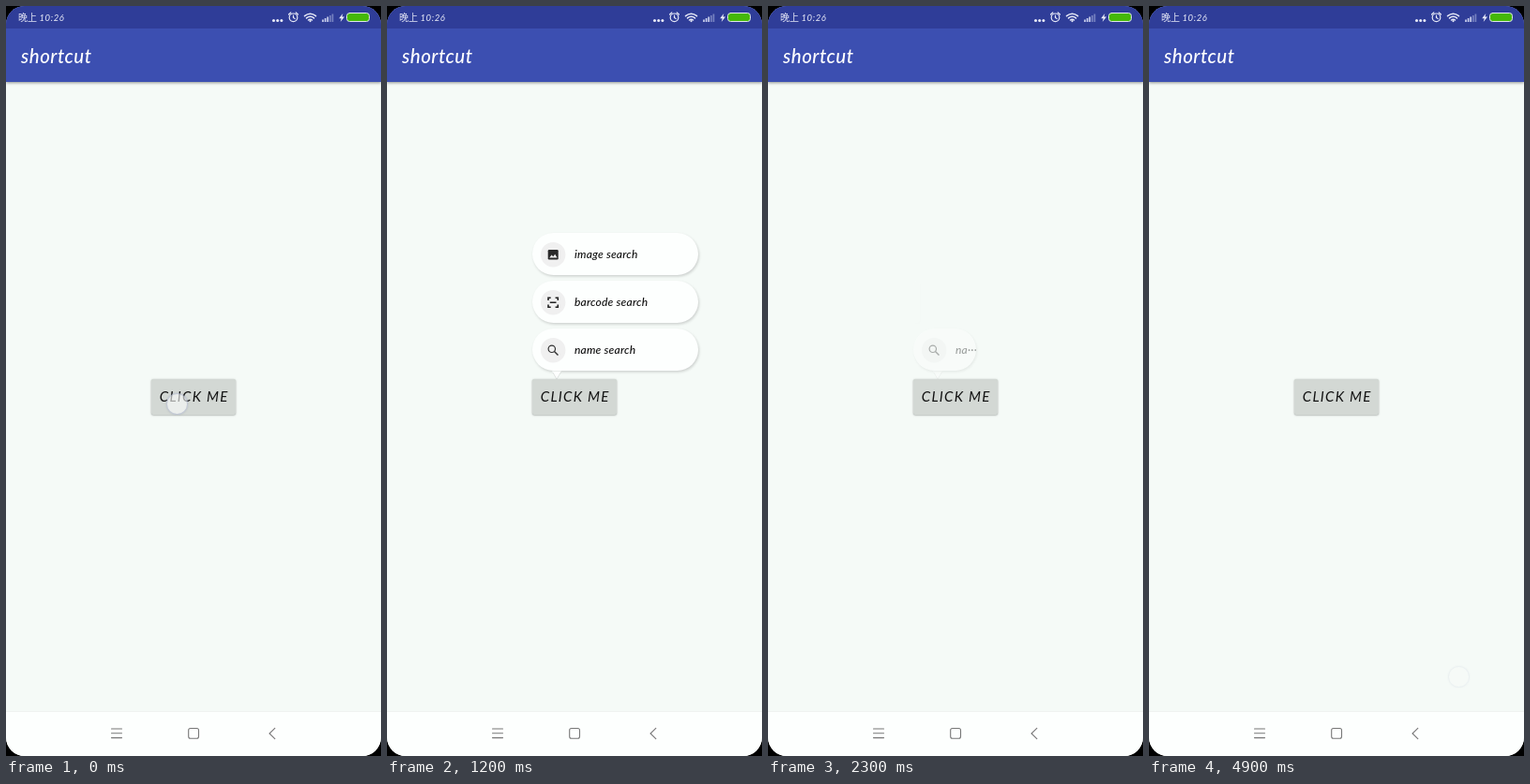
Write an HTML page that moves like this. It is 400 by 800 pixels and loops after 5200 ms.

```html
<!DOCTYPE html>
<html lang="en">
<head>
<meta charset="utf-8">
<title>shortcut</title>
<style>
html, body { margin: 0; width: 100%; height: 100%; overflow: hidden; background: #000; }
#screen {
  position: relative; width: 400px; height: 800px; overflow: hidden;
  border-radius: 20px; background: #f5faf7;
  font-family: Lato, "Open Sans", sans-serif; font-style: italic;
}
#screen div, #screen svg { position: absolute; }
#bar { left: 0; top: 0; width: 400px; height: 81px; background: #3c4fb1; box-shadow: 0 1px 3px rgba(0,0,0,.42); }
#status { left: 0; top: 0; width: 400px; height: 24px; background: #2f3d98; }
#nav { left: 0; top: 752px; width: 400px; height: 48px; background: #fdfffe; }
#chrome { left: 0; top: 0; }
#button {
  left: 154.5px; top: 398px; width: 90.5px; height: 38px; overflow: hidden; border-radius: 2px;
  background: #d3d8d4; box-shadow: 0 .5px 2px rgba(0,0,0,.36);
}
#button span {
  position: absolute; left: 9.3px; top: 0; line-height: 37px; white-space: nowrap;
  font-size: 15px; letter-spacing: 1.25px; color: #111;
}
.row {
  left: 154.5px; height: 45px; overflow: hidden; border-radius: 22.5px;
  background: #fdfffe; box-shadow: 1px 1.5px 3px rgba(0,0,0,.17);
}
.row span {
  position: absolute; left: 45.5px; top: 0; line-height: 45px; white-space: pre;
  font-size: 12px; font-weight: 500; letter-spacing: .2px; color: #111;
}
.row svg { left: 9px; top: 9.5px; }
.ripple { border-radius: 50%; background: #000; }
#tip { left: 175px; top: 388.5px; }
#touch {
  width: 23px; height: 23px; border-radius: 50%; box-sizing: border-box;
  background: rgba(250,252,251,.62); border: 1px solid rgba(135,145,180,.4);
  box-shadow: 0 0 2px rgba(80,90,120,.25);
}
</style>
</head>
<body>
<div id="screen">
  <div id="bar"><div id="status"></div></div>
  <div id="nav"></div>
  <svg id="chrome" width="400" height="800" fill="none" stroke-linecap="round">
    <g fill="#e9ebf8">
      <text x="13" y="16" font-size="10" font-style="normal" font-family="'Noto Sans CJK SC','Noto Sans CJK',sans-serif">晚上</text>
      <text x="35.5" y="16.3" font-size="9.5" letter-spacing=".6">10:26</text>
      <circle cx="285.5" cy="15.5" r="1.5"/><circle cx="289.7" cy="15.5" r="1.5"/><circle cx="293.9" cy="15.5" r="1.5"/>
      <path d="M359.3 8 L355.2 13.3 H357.7 L356.7 17 L361 11.6 H358.4 Z"/>
    </g>
    <text x="16" y="60.5" font-size="20.5" font-weight="500" letter-spacing=".5" fill="#fff">shortcut</text>
    <g stroke="#e4e7f6" stroke-width="1.2">
      <circle cx="306.5" cy="12.3" r="4.3"/>
      <path d="M306.5 10 V12.5 L308.2 13.5 M301.5 9 L303.8 7 M311.5 9 L309.2 7"/>
      <path d="M318.5 10.7 Q324.5 5.7 330.5 10.7 M320.5 12.9 Q324.5 9.6 328.5 12.9 M322.5 15 Q324.5 13.4 326.5 15" stroke-width="1.5"/>
      <circle cx="324.5" cy="16.1" r=".5"/>
    </g>
    <g stroke-width="1.7" stroke-linecap="butt">
      <path d="M338 17 V14.5 M340.6 17 V13 M343.2 17 V11.5" stroke="#c9cfed"/>
      <path d="M345.8 17 V10 M348.4 17 V8.5" stroke="#7682c0"/>
    </g>
    <rect x="363.5" y="7.5" width="24" height="9" rx="3" fill="#45b80a" stroke="#dfe6ea"/>
    <path d="M0 752.5 H400" stroke="#eff2f0"/>
    <g stroke="#777" stroke-width="1.1">
      <path d="M112.5 771 H123.5 M112.5 775.8 H123.5 M112.5 780.6 H123.5 M286.8 770.3 L281 776 L286.8 781.7"/>
      <rect x="194.7" y="770.5" width="10.8" height="10.8" rx="2"/>
    </g>
  </svg>
  <div id="button"><div class="ripple"></div><span>CLICK ME</span></div>
  <svg id="tip" width="12" height="10"><path d="M1 .5 H11 L6 9 Z" fill="#fdfffe"/><path d="M2 2 L6 9 L10.5 1.5" fill="none" stroke="#000" stroke-opacity=".1"/></svg>
  <div id="touch"></div>
</div>
<script>
const LOOP = 5200, STEP = 50, FULL = 177, DISMISSED = 2350;
const screenEl = document.getElementById('screen');
const touchEl = document.getElementById('touch');
const tip = document.getElementById('tip');

const icons = {
  image: '<rect x="7.7" y="8" width="11" height="10.5" rx="1.3" fill="#2a2a2a"/><path d="M9.2 16.5 L11.6 13.5 L13.2 15.2 L15.2 12.8 L17.5 16.5 Z" fill="#f0f0f0"/>',
  barcode: '<path d="M8 11 V8.3 H10.7 M15.6 8.3 H18.3 V11 M18.3 15.6 V18.2 H15.6 M10.7 18.2 H8 V15.6 M9.8 13.2 H16.5" fill="none" stroke="#222" stroke-width="1.6"/>',
  name: '<circle cx="11.8" cy="11.8" r="3.7" fill="none" stroke="#333" stroke-width="1.2"/><path d="M14.5 14.5 L18.5 18.5" stroke="#333" stroke-width="1.5"/>'
};

// key, top, opening start, closing start
const rows = [
  ['image', 242, 335, 2087],
  ['barcode', 293, 283, 2127],
  ['name', 344, 251, 2185]
].map(([key, top, open, close]) => {
  const el = document.createElement('div');
  el.className = 'row';
  el.style.top = top + 'px';
  el.innerHTML = '<div class="ripple"></div><svg width="27" height="27">' +
    `<circle cx="13.2" cy="13.2" r="13.2" fill="#f0f0f0"/>${icons[key]}</svg><span></span>`;
  screenEl.insertBefore(el, tip);
  return { el, open, close, text: key + ' search', label: el.querySelector('span') };
});

const ripples = [
  { el: document.querySelector('#button .ripple'), x: 27, y: 26, r: 80, dark: .1, on: 50, full: 250, off: 400, end: 500 },
  { el: rows[0].el.querySelector('.ripple'), x: 111, y: 30, r: 125, dark: .21, on: 1790, full: 1890, off: 1950, end: 2100 }
];

const touches = [
  { x: 182, y: 424, on: 0, off: 100, end: 350 },
  { x: 265.5, y: 272, on: 1800, off: 2050, end: 2300 },
  { x: 330, y: 715, on: 4550, off: 4670, end: 4960 }
];

const pen = document.createElement('canvas').getContext('2d');
pen.font = 'italic 500 12px Lato, "Open Sans", sans-serif';

const part = (t, a, b) => Math.min(1, Math.max(0, (t - a) / (b - a)));
const smooth = x => (1 - Math.cos(Math.PI * x)) / 2;

function fit(text, room) {
  if (pen.measureText(text).width <= room) return text;
  let n = text.length;
  while (n && pen.measureText(text.slice(0, n) + '···').width > room) n--;
  return n ? text.slice(0, n) + '···' : '';
}

function drawRow(row, t) {
  const gone = t >= DISMISSED ? 1 : smooth(part(t, row.close, row.close + 200));
  const size = smooth(part(t, row.open, row.open + 165)) * (1 - gone);
  const width = FULL * size;
  row.el.style.display = width > .5 ? 'block' : 'none';
  row.el.style.width = width + 'px';
  row.el.style.opacity = 1 - gone;
  row.label.textContent = fit(row.text, width - 44);
  return size > .05 ? 1 - gone : 0;
}

function drawRipple(p, t) {
  const r = p.r * part(t, p.on, p.full);
  Object.assign(p.el.style, {
    left: p.x - r + 'px', top: p.y - r + 'px',
    width: 2 * r + 'px', height: 2 * r + 'px',
    opacity: p.dark * (1 - part(t, p.off, p.end))
  });
}

function drawTouch(t) {
  const p = touches.find(q => t >= q.on && t < q.end);
  touchEl.style.opacity = p ? 1 - part(t, p.off, p.end) : 0;
  if (!p) return;
  touchEl.style.left = p.x - 11.5 + 'px';
  touchEl.style.top = p.y - 11.5 + 'px';
}

function draw(time) {
  const t = Math.floor(time % LOOP / STEP) * STEP;
  const shown = rows.map(row => drawRow(row, t));
  tip.style.opacity = shown[2];
  ripples.forEach(p => drawRipple(p, t));
  drawTouch(t);
}

const start = performance.now();
function tick() {
  draw(performance.now() - start);
  requestAnimationFrame(tick);
}
tick();
</script>
</body>
</html>
```
